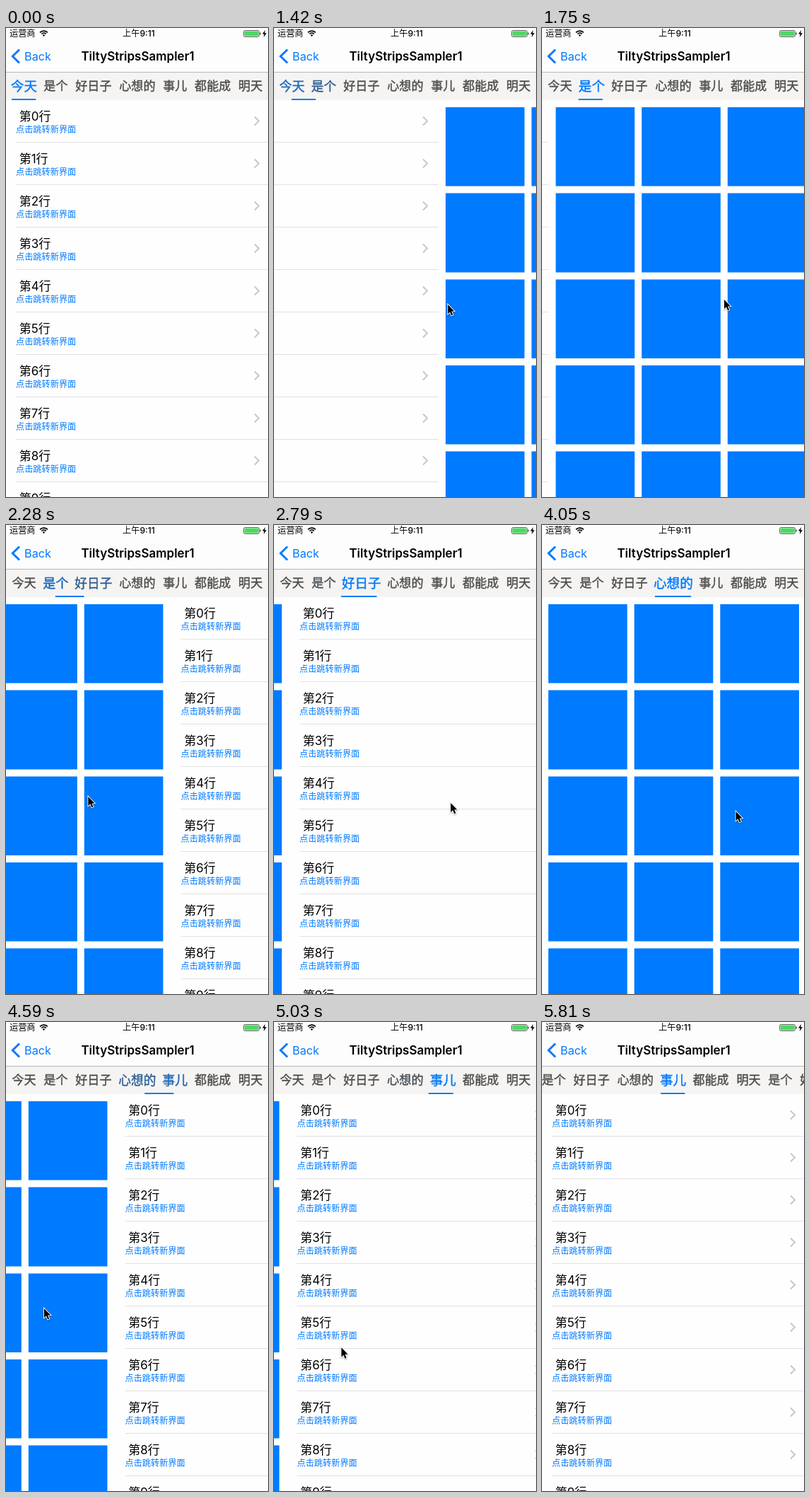
Recreate the animation shown at these times as an HTML page with a canvas. Size 371x663 px, loop 6110 ms.

```html
<!DOCTYPE html>
<html lang="zh">
<head>
<meta charset="utf-8">
<style>
html, body { margin: 0; width: 100%; height: 100%; overflow: hidden; background: #fff; }
canvas { display: block; width: 371px; height: 663px; }
</style>
</head>
<body>
<canvas id="stage"></canvas>
<script>
const W = 371, H = 663, LOOP = 6110;
const PAGE = 375, LEFT = -1, TOP = 102;
const BLUE = '#007aff';
const FONT = 'Inter, "Noto Sans CJK SC", "Noto Sans CJK", sans-serif';
const TABS = ['今天', '是个', '好日子', '心想的', '事儿', '都能成', '明天', '是个', '好日子'];

// Each swipe drags the page from a grab point, holds it, then lets it snap to the next page.
const SNAP = 445;
const SWIPES = [
  { start: 1060, held: 1320, release: 1395, drag: 111, x: 354, y: 393 },
  { start: 2080, held: 2340, release: 2490, drag: 163, x: 258, y: 384 },
  { start: 3120, held: 3430, release: 3610, drag: 83, x: 252, y: 393 },
  { start: 4320, held: 4590, release: 4740, drag: 220.5, x: 274.5, y: 405 }
];
const ENTER = { start: 560, end: 740, x: 290, y: 402 };
const EXIT = { start: 4740, end: 5750, x: 260, y: 680 };

const canvas = document.getElementById('stage');
const ratio = window.devicePixelRatio || 1;
canvas.width = W * ratio;
canvas.height = H * ratio;
const ctx = canvas.getContext('2d');

const mix = (a, b, p) => a + (b - a) * p;
const span = (t, start, end) => Math.min(1, Math.max(0, (t - start) / (end - start)));
const smooth = u => u * u * (3 - 2 * u);
const easeOut = (u, power) => 1 - (1 - u) ** power;
const halfPixel = v => Math.round(v * 2) / 2;

const dragged = (swipe, t) => swipe.drag * smooth(span(t, swipe.start, swipe.held));
const snapped = (swipe, t) => span(t, swipe.release, swipe.release + SNAP);

function scrollAt(t) {
  return SWIPES.reduce((sum, swipe) =>
    sum + mix(dragged(swipe, t), PAGE, easeOut(snapped(swipe, t), 2)), 0);
}

function pointerAt(t) {
  const enter = smooth(span(t, ENTER.start, ENTER.end));
  const exit = smooth(span(t, EXIT.start, EXIT.end));
  let { x, y } = ENTER;
  x = mix(x, SWIPES[0].x, enter);
  y = mix(y, SWIPES[0].y, enter);
  SWIPES.forEach((swipe, i) => {
    const next = SWIPES[i + 1] || EXIT;
    const back = next === EXIT ? exit : easeOut(snapped(swipe, t), 4);
    x = mix(x - dragged(swipe, t), next.x, back);
    y = mix(y, next.y, back);
  });
  return [x, y];
}

function text(str, x, baseline, size, color, weight = 400, align = 'left') {
  ctx.font = `${weight} ${size}px ${FONT}`;
  ctx.textAlign = align;
  ctx.fillStyle = color;
  ctx.fillText(str, x, baseline);
}

function rect(x, y, w, h, color) {
  ctx.fillStyle = color;
  ctx.fillRect(x, y, w, h);
}

function trace(points) {
  ctx.beginPath();
  points.forEach(([x, y]) => ctx.lineTo(x, y));
}

function line(points, color, width) {
  trace(points);
  ctx.strokeStyle = color;
  ctx.lineWidth = width;
  ctx.stroke();
}

function drawList(x) {
  for (let row = 0; row < 10; row++) {
    const y = TOP + row * 60;
    text(`第${row}行`, x + 19.7, y + 29.3, 17, '#000');
    text('点击跳转新界面', x + 15, y + 45.5, 12.2, BLUE);
    line([[x + 353, y + 23.5], [x + 359, y + 29.5], [x + 353, y + 35.5]], '#c7c7cc', 2);
    rect(x + 15, y + 59, PAGE - 15, 1, '#e1e1e4');
  }
}

function drawGrid(x) {
  const size = (PAGE - 40) / 3, pitch = size + 10;
  for (let i = 0; i < 15; i++) {
    const top = TOP + 10 + Math.floor(i / 3) * pitch;
    const y = halfPixel(top);
    rect(x + 10 + (i % 3) * pitch, y, size, halfPixel(top + size) - y, BLUE);
  }
}

function drawPages(scroll) {
  for (let i = 0; i <= SWIPES.length; i++) {
    const x = halfPixel(LEFT + i * PAGE - scroll);
    if (x > -PAGE && x < W) (i % 2 ? drawGrid : drawList)(x);
  }
}

function drawTabs(position, shift) {
  rect(0, 63, W, 39, '#f5f4f2');
  let x = 8.2 - shift;
  const boxes = TABS.map(label => {
    const box = { label, x, w: label.length * 17.1 };
    x += box.w + 10.7;
    return box;
  });
  boxes.forEach(({ label, x, w }, i) => {
    const p = Math.max(0, 1 - Math.abs(position - i));
    const color = `rgb(${mix(77, 0, p)}, ${mix(77, 122, p)}, ${mix(77, 255, p)})`;
    const scale = 1 + 0.09 * p;
    ctx.save();
    ctx.translate(x + w / 2 + 0.2, 82);
    ctx.scale(scale, scale);
    text(label, 0, 6.3, 17.1, color, 500, 'center');
    // A hairline outline gives the labels their medium weight.
    ctx.strokeStyle = color;
    ctx.lineWidth = 0.4;
    ctx.strokeText(label, 0, 6.3);
    ctx.restore();
  });
  const from = boxes[Math.floor(position)], to = boxes[Math.ceil(position)], p = position % 1;
  rect(mix(from.x, to.x, p) - 0.2, 100, mix(from.w, to.w, p), 2, BLUE);
}

function drawStatus() {
  text('运营商', 5, 12.4, 12.2, '#000');
  text('上午9:11', 188, 12.4, 12.2, '#000', 500, 'center');

  ctx.strokeStyle = '#000';
  ctx.lineWidth = 1.7;
  for (const r of [4.4, 7.4]) {
    ctx.beginPath();
    ctx.arc(53.5, 11.5, r, -Math.PI * 0.76, -Math.PI * 0.24);
    ctx.stroke();
  }
  ctx.fillStyle = '#000';
  ctx.beginPath();
  ctx.moveTo(53.5, 12.3);
  ctx.arc(53.5, 11.5, 2.2, -Math.PI * 0.78, -Math.PI * 0.22);
  ctx.fill();

  ctx.strokeStyle = '#444';
  ctx.lineWidth = 0.8;
  ctx.beginPath();
  ctx.roundRect(336.5, 3.5, 22, 9, 2);
  ctx.stroke();
  rect(337.5, 4.5, 20, 7, '#4cd964');
  rect(359.5, 6.5, 1.3, 3, '#444');
  ctx.fillStyle = '#000';
  trace([[367, 3], [363, 8.6], [365.6, 8.6], [364.8, 13], [369, 7.3], [366.3, 7.3]]);
  ctx.fill();
}

function drawHeader() {
  rect(0, 0, W, 62, '#fdfdfd');
  rect(0, 62, W, 1, '#b7b7b9');
  drawStatus();
  line([[19, 30.5], [9.3, 40], [19, 49.5]], BLUE, 3);
  text('Back', 26, 46, 16.3, BLUE);
  text('TiltyStripsSampler1', 186.5, 46, 17, '#000', 600, 'center');
}

function drawPointer(x, y) {
  ctx.save();
  ctx.translate(x, y);
  ctx.scale(0.9, 0.9);
  trace([[0, 0], [0, 14.5], [3.3, 11.5], [5.7, 17], [8, 16], [5.6, 10.7], [10, 10.3]]);
  ctx.closePath();
  ctx.shadowColor = 'rgba(0, 0, 0, 0.35)';
  ctx.shadowBlur = 2 * ratio;
  ctx.shadowOffsetY = ratio;
  ctx.strokeStyle = '#fff';
  ctx.lineWidth = 2;
  ctx.stroke();
  ctx.shadowColor = 'transparent';
  ctx.fillStyle = '#000';
  ctx.fill();
  ctx.restore();
}

function draw(t) {
  const scroll = scrollAt(t);
  ctx.setTransform(ratio, 0, 0, ratio, 0, 0);
  rect(0, 0, W, H, '#fefefe');
  drawPages(scroll);
  drawTabs(scroll / PAGE, 53.7 * smooth(span(t, 5080, 5400)));
  drawHeader();
  if (t >= ENTER.start && t < EXIT.end) drawPointer(...pointerAt(t));
}

const begin = performance.now();
function tick() {
  draw((performance.now() - begin) % LOOP);
  requestAnimationFrame(tick);
}
tick();
</script>
</body>
</html>
```
